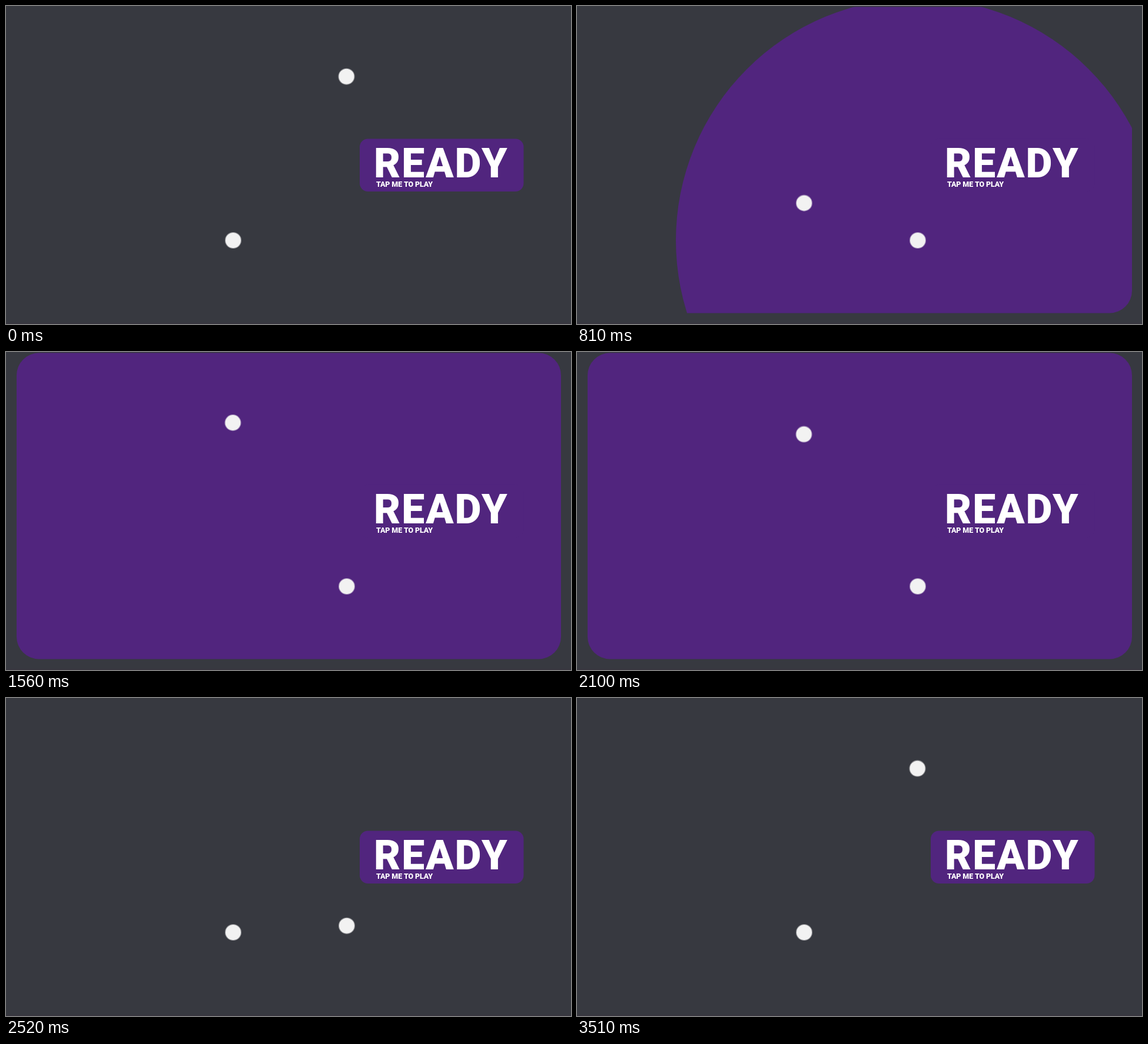
Recreate the animation shown at these times as an HTML page with a canvas. Size 960 by 540 pixels, loop 3.54 s.

```html
<!DOCTYPE html>
<html lang="en">
<head>
<meta charset="utf-8">
<title>Ready</title>
<style>
html, body { margin: 0; width: 100%; height: 100%; overflow: hidden; background: #373940; }
canvas { display: block; }
</style>
</head>
<body>
<canvas id="stage" width="960" height="540"></canvas>
<script>
const ctx = document.getElementById('stage').getContext('2d');

const LOOP = 3540, HALF = LOOP / 2, STEP = 30;
const RIGHT_HIT = 738;            // the left ball lands half a loop later
const RISE = 962, FALL = HALF - RISE;
const TOP = 119.7, FLOOR = 398;
const RIPPLE_SPEED = 411 / 72;
const PURPLE = '#51257e', DARK = '#373940', BALL = '#f2f2f2';

// Cubic Bézier ease-in with control points (a, 0) and (b, 0).
function easeIn(x, a, b) {
  let lo = 0, hi = 1;
  for (let i = 0; i < 24; i++) {
    const t = (lo + hi) / 2, s = 1 - t;
    if (3 * s * s * t * a + 3 * s * t * t * b + t * t * t < x) lo = t;
    else hi = t;
  }
  return lo ** 3;
}

// Depth below the top of a jump: 1 on the floor, 0 at the top.
function depth(age) {
  if (age >= HALF) return 1;
  return age < RISE
    ? easeIn(1 - age / RISE, 0.45, 0.693)
    : easeIn((age - RISE) / FALL, 0.389, 0.85);
}

function roundRect(x, y, w, h, r) {
  ctx.beginPath();
  ctx.roundRect(x, y, w, h, r);
}

function circle(x, y, r) {
  ctx.beginPath();
  ctx.arc(x, y, r, 0, Math.PI * 2);
}

function drawBall(x, d) {
  const left = x - 0.5 * (1 - d), y = TOP + (FLOOR - TOP) * d;
  circle(left, y, 13);
  ctx.fillStyle = BALL;
  ctx.fill();
  circle(left, y, 13.4);
  ctx.strokeStyle = 'rgba(242, 242, 242, 0.45)';
  ctx.lineWidth = 1.4;
  ctx.stroke();
}

function drawRipple(radius) {
  ctx.save();
  roundRect(18, 1.5, 925, 520, 38);
  ctx.clip();
  circle(579, FLOOR, radius);
  ctx.fillStyle = PURPLE;
  ctx.fill();
  ctx.restore();
}

function drawText(text, x, y, size, spacing) {
  ctx.font = `900 ${size}px Roboto, sans-serif`;
  ctx.letterSpacing = spacing + 'px';
  ctx.fillStyle = '#fff';
  ctx.fillText(text, x, y);
}

function draw(time) {
  const age = (time - RIGHT_HIT + LOOP) % LOOP;

  ctx.fillStyle = DARK;
  ctx.fillRect(0, 0, 960, 540);
  ctx.fillStyle = '#38363f';
  ctx.fillRect(0, 538, 960, 2);

  if (age < HALF) drawRipple(age * RIPPLE_SPEED);

  roundRect(601, 225.5, 278.5, 89.5, 14);
  ctx.fillStyle = PURPLE;
  ctx.fill();
  drawText('READY', 625, 290.5, 69.5, 2);
  drawText('TAP ME TO PLAY', 629, 307, 12.5, -0.15);

  drawBall(386, depth(age));
  drawBall(579, depth((age + HALF) % LOOP));
}

const start = performance.now();
function tick() {
  const time = (performance.now() - start) % LOOP;
  draw(Math.floor(time / STEP) * STEP);
  requestAnimationFrame(tick);
}
tick();
</script>
</body>
</html>
```
